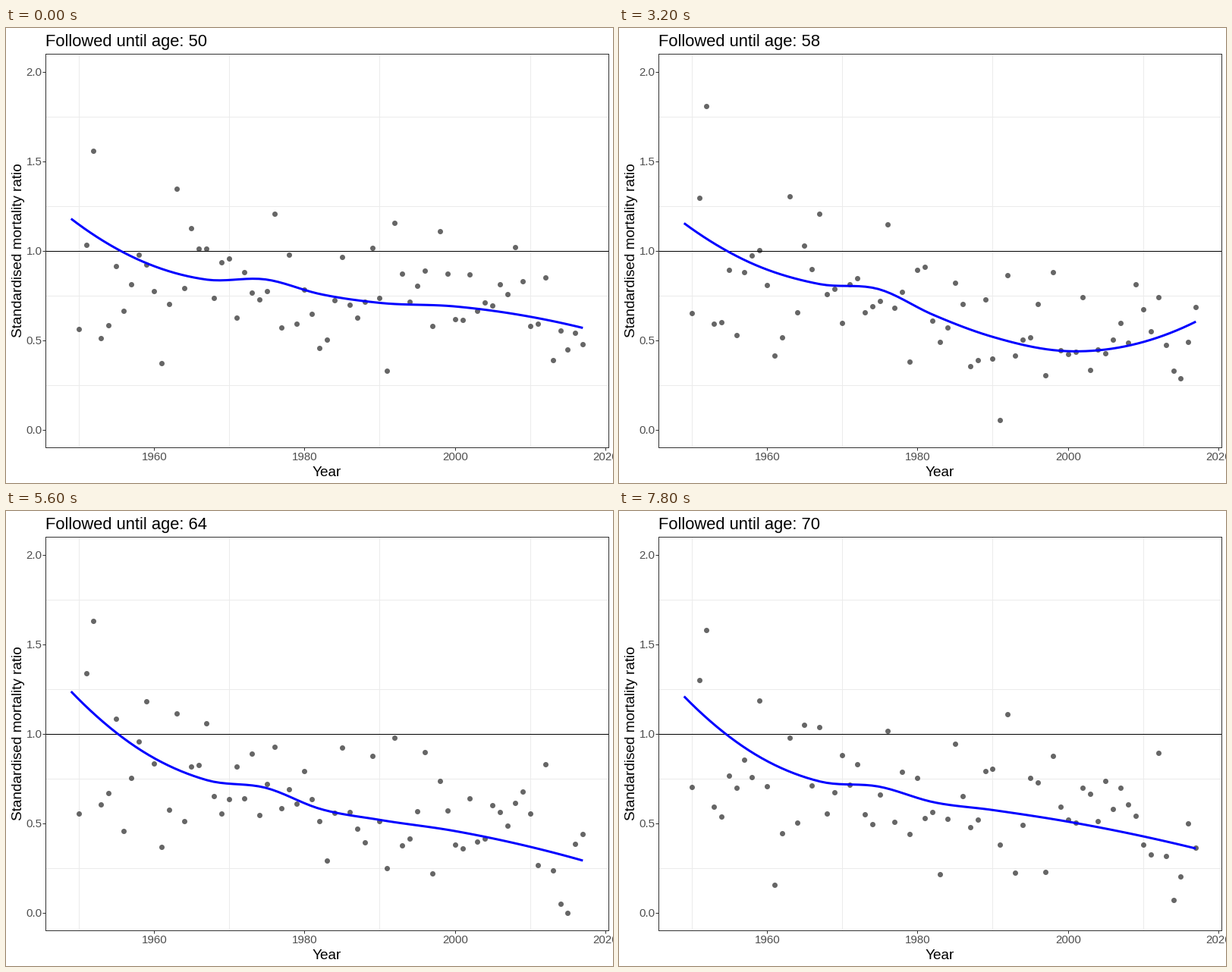
Write a matplotlib script that moves like this. It is 800 px wide and 600 px high and loops after 8 s.

```python
import numpy as np
import matplotlib.pyplot as plt
from matplotlib.animation import FuncAnimation

W, H, DPI = 800, 600, 100
FRAMES, STEP_MS = 40, 200
FIRST_AGE, LAST_AGE = 50, 70
LEFT, RIGHT, TOP, BOTTOM = 52, 794, 34, 553   # panel edges in pixels
ZERO_Y, UNIT = 530, 236                       # pixel row of ratio 0, pixels per 1.0
X_MIN, X_MAX = 1945.6, 2020.4
DARK, GREY, GRID = "#333333", "#4d4d4d", "#ebebeb"

plt.rcParams["font.family"] = "Liberation Sans"

years = np.arange(1950, 2018)
ages = np.arange(FIRST_AGE, LAST_AGE + 1)
steps = np.arange(FRAMES)
age_steps = np.round((ages - FIRST_AGE) * (FRAMES - 1) / (LAST_AGE - FIRST_AGE))

# trend curve: height at a few years for each key step
knot_years = np.array([1949, 1957, 1967, 1975, 1982, 1990, 2000, 2017])
knots = {
    0: [1.18, .97, .84, .84, .76, .71, .69, .57],
    10: [1.17, .98, .86, .84, .725, .61, .535, .70],
    16: [1.155, .95, .815, .785, .645, .52, .44, .605],
    24: [1.24, .95, .75, .70, .555, .48, .435, .305],
    32: [1.235, .94, .735, .695, .61, .56, .48, .28],
    39: [1.21, .925, .735, .705, .62, .575, .51, .36],
}

# birth years that stay well above or below the trend
strays = {1950: -.43, 1952: .5, 1953: -.53, 1954: -.45, 1956: -.45,
          1961: -.55, 1963: .4, 1967: .35, 1976: .3, 1985: .3,
          1991: -.35, 1992: .4, 1996: .35, 1998: .35, 2012: .4}


def spline(x, xk, yk):
    """Cubic Hermite curve through the knots."""
    m = np.gradient(yk, xk, edge_order=2)
    i = np.clip(np.searchsorted(xk, x, side="right") - 1, 0, len(xk) - 2)
    h = xk[i + 1] - xk[i]
    t = (x - xk[i]) / h
    return ((1 + 2 * t) * (1 - t) ** 2 * yk[i] + t * (1 - t) ** 2 * h * m[i]
            + t * t * (3 - 2 * t) * yk[i + 1] + t * t * (t - 1) * h * m[i + 1])


def over_steps(keys, rows):
    """Interpolate each column of rows linearly to all steps."""
    return np.array([np.interp(steps, keys, col) for col in np.array(rows).T]).T


knot_rows = over_steps(list(knots), list(knots.values()))


def trend(x):
    return np.array([spline(x, knot_years, np.array(row)) for row in knot_rows])


def scatter():
    """Lasting offset per birth year plus a drift from age to age."""
    rng = np.random.default_rng(12)
    offset = rng.normal(-.02, .12, len(years))
    for year, gap in strays.items():
        offset[year - years[0]] = gap
    drift = [rng.normal(0, .1, len(years))]
    for _ in ages[1:]:
        drift.append(.75 * drift[-1] + rng.normal(0, .066, len(years)))
    return offset + over_steps(age_steps, drift)


curve_x = np.linspace(1949, 2017, 80)
curves = trend(curve_x)
points = np.maximum(trend(years) + scatter(), 0)


def pt(px):
    return px * 72 / DPI


fig = plt.figure(figsize=(W / DPI, H / DPI), dpi=DPI, facecolor="white")
ax = fig.add_axes([LEFT / W, 1 - BOTTOM / H,
                   (RIGHT - LEFT) / W, (BOTTOM - TOP) / H])
ax.set_xlim(X_MIN, X_MAX)
ax.set_ylim((ZERO_Y - BOTTOM) / UNIT, (ZERO_Y - TOP) / UNIT)
ax.set_xticks([1960, 1980, 2000, 2020])
ax.set_yticks([0, .5, 1, 1.5, 2])
ax.tick_params(length=pt(4), width=pt(1), color=DARK,
               labelbottom=False, labelleft=False)
for spine in ax.spines.values():
    spine.set(color=DARK, linewidth=pt(1))


def label(x, y, text, size, color="black", **kw):
    return fig.text(x / W, 1 - y / H, text, fontsize=pt(size), color=color,
                    va="baseline", **kw)


for year in (1950, 1970, 1990, 2010):
    ax.axvline(year, color=GRID, lw=pt(1), zorder=0)
for ratio in (.25, .75, 1.25, 1.75):
    ax.axhline(ratio, color=GRID, lw=pt(1), zorder=0)
ax.axhline(1, color="black", lw=pt(1), zorder=1)

per_year = (RIGHT - LEFT) / (X_MAX - X_MIN)
for year in ax.get_xticks():
    label(LEFT + (year - X_MIN) * per_year + .5, 570, f"{year:.0f}", 15, GREY,
          ha="center")
for ratio in ax.get_yticks():
    label(47.5, ZERO_Y + 5 - UNIT * ratio, f"{ratio:.1f}", 15, GREY, ha="right")
label(422.5, 591, "Year", 19, ha="center")
label(21, 293, "Standardised mortality ratio", 19, ha="center",
      rotation=90, rotation_mode="anchor")

title = label(52, 24, "", 22)
dots, = ax.plot([], [], "o", color="black", alpha=.6, ms=pt(7), mew=0, zorder=2)
curve, = ax.plot([], [], color="blue", lw=pt(3), solid_capstyle="butt", zorder=3)


def draw(i):
    age = FIRST_AGE + (LAST_AGE - FIRST_AGE) * i / (FRAMES - 1)
    title.set_text(f"Followed until age: {round(age)}")
    dots.set_data(years, points[i])
    curve.set_data(curve_x, curves[i])
    return title, dots, curve


anim = FuncAnimation(fig, draw, frames=FRAMES, interval=STEP_MS,
                     init_func=lambda: draw(0), repeat=True)
plt.show()
```
